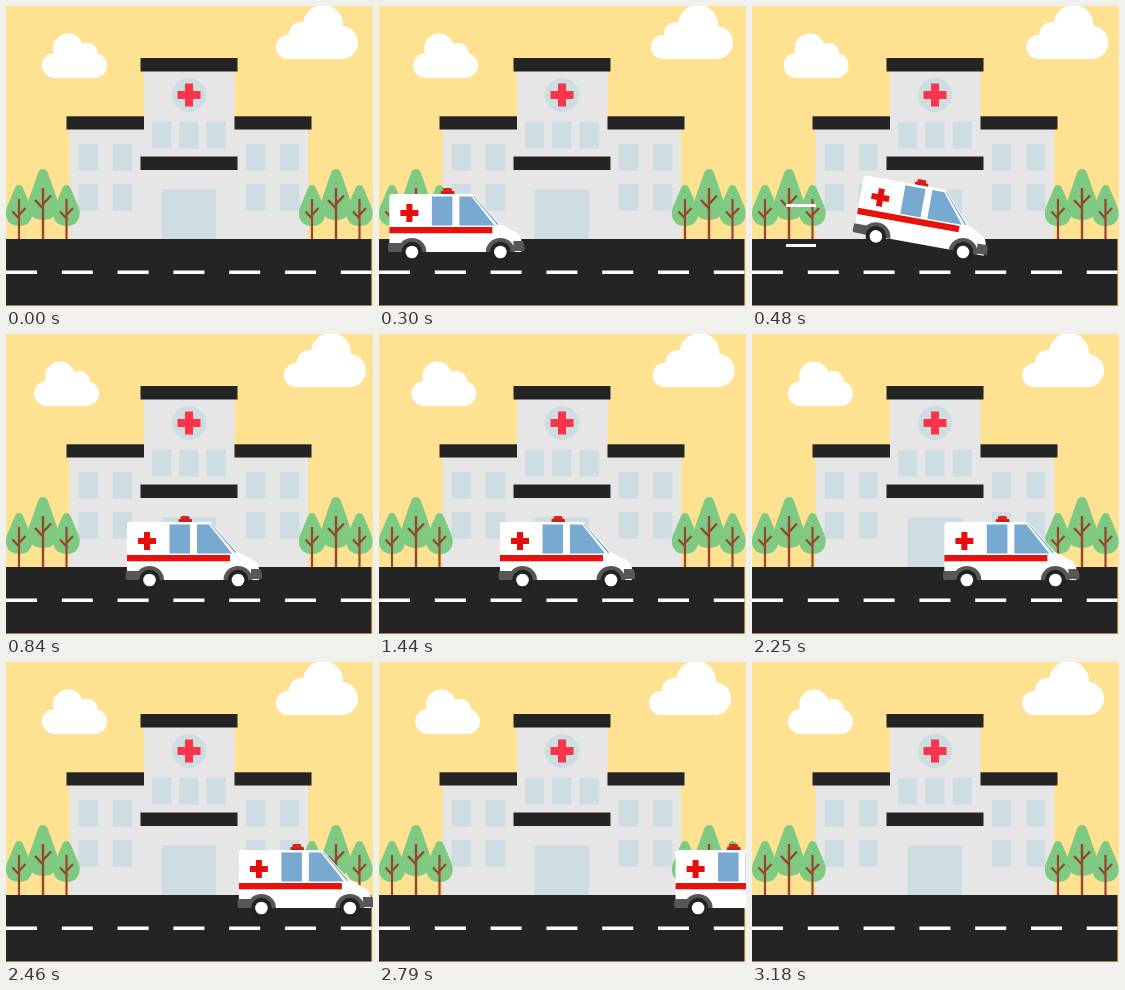
Recreate the animation shown at these times as an HTML page. Size 367x300 px, loop 3.6 s.

```html
<!DOCTYPE html>
<html lang="en">
<head>
<meta charset="utf-8">
<title>Ambulance at the hospital</title>
<style>
  html, body { margin: 0; width: 100%; height: 100%; overflow: hidden; background: #ffe192; }
  svg { display: block; width: 100vw; height: 100vh; }
</style>
</head>
<body>
<svg viewBox="0 0 367 300" preserveAspectRatio="none">
  <defs>
    <g id="tree">
      <path d="M0-41C2-41 3-40 4-38L12-19C15-10 12 0 0 0S-15-10-12-19L-4-38C-3-40-2-41 0-41Z" fill="#7fca83"/>
      <path d="M0-27V13M-6.500-14.500L0-7.500M6.500-18L0-11" fill="none" stroke="#98452f" stroke-width="2.200"/>
    </g>
    <g id="bigTree">
      <path d="M0-58C2.500-58 4-56.500 5-54L14-28C18-17 13-7 0-7S-18-17-14-28L-5-54C-4-56.500-2.500-58 0-58Z" fill="#7fca83"/>
      <path d="M0-39V12M-8-27L0-18.500M8-31.500L0-23" fill="none" stroke="#98452f" stroke-width="2.400"/>
    </g>
    <g id="grove">
      <use href="#tree" x="-24" y="220"/>
      <use href="#bigTree" y="221"/>
      <use href="#tree" x="23.500" y="220"/>
    </g>
    <g id="wheel">
      <path d="M-14.500 0A14.500 14 0 0 1 14.500 0Z" fill="#5b5656"/>
      <circle r="10.300" fill="#222"/>
      <circle r="6.300" fill="#fff"/>
    </g>
  </defs>

  <rect width="367" height="300" fill="#ffe192"/>

  <g id="cloudL" fill="#fff">
    <rect x="36" y="47" width="65" height="25" rx="12.5"/>
    <circle cx="62" cy="42.5" r="15"/>
    <circle cx="81" cy="48" r="11"/>
    <rect x="48" y="45" width="40" height="20"/>
  </g>
  <g id="cloudR" fill="#fff">
    <rect x="270" y="29" width="60" height="24" rx="12"/>
    <circle cx="295" cy="28" r="12"/>
    <circle cx="317" cy="19" r="20"/>
    <circle cx="335.5" cy="36.5" r="16.5"/>
    <rect x="289" y="28" width="46" height="25"/>
  </g>

  <g fill="#e6e6e6">
    <rect x="63.500" y="122" width="238.500" height="111"/>
    <rect x="138" y="64" width="90.500" height="80"/>
  </g>
  <g fill="#242424">
    <rect x="60.500" y="110.300" width="77.500" height="13.200"/>
    <rect x="228.500" y="110.300" width="77" height="13.200"/>
    <rect x="134.500" y="52" width="97" height="13.500"/>
    <rect x="134.500" y="150.500" width="97" height="13.500"/>
  </g>
  <g id="glass" fill="#cddde1">
    <circle cx="183" cy="89" r="17"/>
    <rect x="155.500" y="183.500" width="54.500" height="49.500"/>
  </g>
  <path d="M179 77.500h8v7.500h7.500v8h-7.500v7.500h-8v-7.500h-7.500v-8h7.500z" fill="#fb3449"/>

  <rect y="233" width="365.500" height="66.500" fill="#242424"/>
  <path d="M0 266.200H365.500" stroke="#fff" stroke-width="3.400" stroke-dasharray="31 24.800"/>
  <use href="#grove" x="37"/>
  <use href="#grove" x="330"/>

  <g id="lines" stroke="#fff" stroke-width="3">
    <line y1="199.500" y2="199.500"/>
    <line y1="239.500" y2="239.500"/>
  </g>

  <g id="car">
    <rect x="172.500" y="185" width="13.500" height="4" rx="1" fill="#c4201c"/>
    <rect x="174.500" y="182" width="9" height="4" rx="1.500" fill="#df221c"/>
    <path d="M124 188H202Q205 188 207 190.500L231 217.500L247 226Q253 229 253 236V246H121V191Q121 188 124 188Z" fill="#fff"/>
    <g fill="#78a9d1">
      <rect x="163.500" y="190.500" width="20.500" height="29"/>
      <path d="M191 190.500H203L226 219.500H191Z"/>
      <path d="M205.500 190L230.500 218.500L229 219L204.500 190Z"/>
    </g>
    <rect x="121" y="221" width="103" height="6.300" fill="#e8120c"/>
    <path d="M138 198h6v6h6v6h-6v6h-6v-6h-6v-6h6z" fill="#e60d0a"/>
    <path d="M120 237H134V246H122Q119.500 246 119.500 243Z" fill="#5b5656"/>
    <path d="M245 235H254.500Q256.500 239 256 245H245Z" fill="#5b5656"/>
    <use href="#wheel" x="143.500" y="246"/>
    <use href="#wheel" x="232" y="246"/>
  </g>
</svg>

<script>
const LOOP = 3600, STEP = 30;
const $ = id => document.getElementById(id);
const clamp = p => Math.min(1, Math.max(0, p));
const span = (t, a, b) => clamp((t - a) / (b - a));
const sine = p => (1 - Math.cos(Math.PI * p)) / 2;

function addWindows(xs, ys, w, h) {
  for (const y of ys) for (const x of xs) {
    const pane = document.createElementNS("http://www.w3.org/2000/svg", "rect");
    Object.entries({ x, y, width: w, height: h }).forEach(([k, v]) => pane.setAttribute(k, v));
    $("glass").append(pane);
  }
}
addWindows([72.5, 106.5, 240, 274], [138, 178], 19.5, 26.5);
addWindows([146, 173.2, 200.5], [116], 19.3, 26.5);

const cloudShift = t => 8 * (sine(span(t, 0, 900)) - sine(span(t, 900, 1920)));

// Race in, brake, wait, pull away, then cruise off stage.
function carShift(t) {
  if (t < 480) return -260 + 239 * t / 480;
  if (t < 1580) return -21 * (1 - span(t, 480, 570)) ** 2;
  if (t < 2160) return 54 * span(t, 1580, 2160) ** 2;
  return 54 + 0.193 * (t - 2160);
}

const carTilt = t => 10.2 * (sine(span(t, 360, 480)) - sine(span(t, 490, 640)));

function draw(t) {
  const drift = cloudShift(t), x = carShift(t);
  $("cloudL").setAttribute("transform", `translate(${-drift} 0)`);
  $("cloudR").setAttribute("transform", `translate(${drift} 0)`);
  $("car").setAttribute("transform", `translate(${x} 0) rotate(${carTilt(t)} 232 246)`);

  const gone = span(t, 480, 570);
  $("lines").style.display = gone < 1 ? "" : "none";
  for (const line of $("lines").children) {
    line.setAttribute("x1", 55 + x);
    line.setAttribute("x2", 55 + x + 30 * (1 - gone));
  }
}

const start = performance.now();
function tick() {
  const t = (performance.now() - start) % LOOP;
  draw(Math.floor(t / STEP) * STEP);
  requestAnimationFrame(tick);
}
tick();
</script>
</body>
</html>
```
